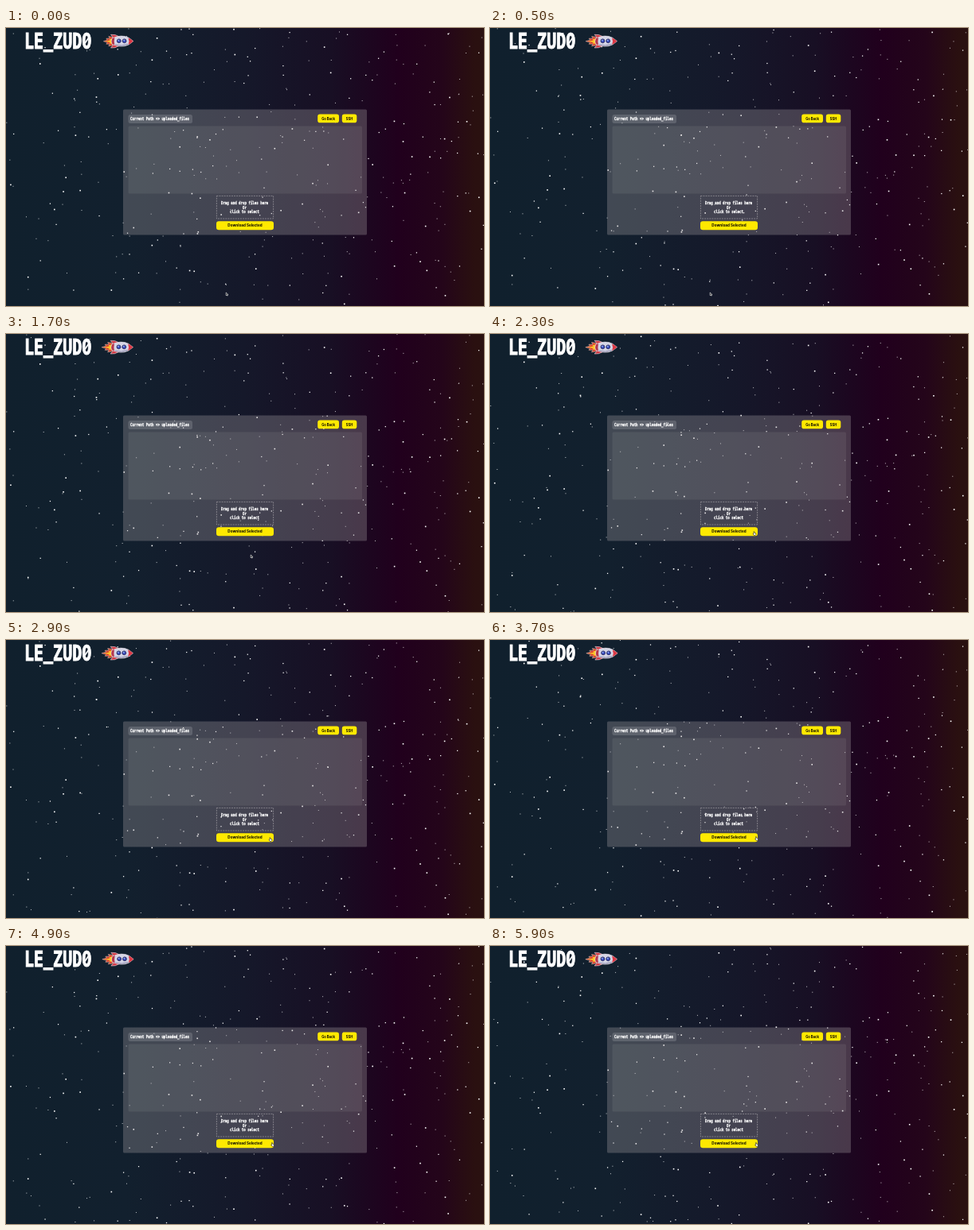
These frames come from a looping animation (600x350 px, 6 s). An HTML page with a canvas:

```html
<!DOCTYPE html>
<html lang="fr">
<head>
<meta charset="utf-8">
<title>LE_ZUDO</title>
<style>
  html, body { margin: 0; width: 100%; height: 100%; overflow: hidden; }
  body {
    position: relative;
    background: linear-gradient(90deg, #10202d 0, #12202e 25%, #15182a 50%, #180f24 68%,
      #1c0720 75%, #21001d 82%, #24051a 91%, #2a1010 98%, #2a1110 100%);
  }
  canvas, svg { position: absolute; left: 0; top: 0; width: 600px; height: 350px; }
  .pixel { font: bold 4.1px "DejaVu Sans Mono", monospace; fill: #fff; stroke: #fff; stroke-width: .22; }
  .title { font-size: 20px; stroke-width: .8; }
  .label { font: 700 4.15px Inter, sans-serif; fill: #000; text-anchor: middle; }
  .big { font-size: 4.6px; }
  .mid { text-anchor: middle; }
  .yellow { fill: #ffe900; }
</style>
</head>
<body>
<canvas id="sky" width="600" height="350"></canvas>
<svg viewBox="0 0 600 350">
  <g transform="translate(23 26) scale(1 1.37)">
    <text class="pixel title">LE<tspan dy="-1.2">_</tspan><tspan dy="1.2">ZUDO</tspan></text>
  </g>
  <path d="M98.5 20L104 12" stroke="#fff" stroke-width="1.8"/>

  <g id="rocket" stroke-linejoin="round">
    <g id="flame">
      <path d="M134 11.5L128 10.5L129.5 13L124.5 13.2L126 15L120.5 16.7L126 18.2L124.5 20.2L129.5 20.2L128 22.8L134 21.8Z" fill="#d9452f" stroke="#e9d3c8" stroke-width=".5"/>
      <path d="M134 13L129 14.2L130 15.4L123.5 16.7L130 18L129 19.2L134 20.3Z" fill="#ffc62b"/>
    </g>
    <path d="M135 12.5L131.5 8.3L137 8.6L143 11.2Z M135 20.8L131.5 25L137 24.7L143 22Z" fill="#d23a44" stroke="#eadfe8" stroke-width=".6"/>
    <path d="M133 13Q145 7.6 154 12.2L159.8 16.6L154 21Q145 25.6 133 20.2Q131.4 16.6 133 13Z" fill="#d5d5e6" stroke="#f3edf4" stroke-width=".6"/>
    <path d="M153.5 12.2Q157.5 14 159.6 16.6Q157.5 19.2 153.5 21Q155.2 16.6 153.5 12.2Z" fill="#dc3945"/>
    <path d="M133.2 13.2L136.3 12Q135.3 16.6 136.3 21.2L133.2 20Q131.8 16.6 133.2 13.2Z" fill="#b5364c"/>
    <path d="M137 21Q145 23.6 153 20.4" fill="none" stroke="#8c8bad" stroke-width="1"/>
    <g fill="#3c4fc0" stroke="#25265c" stroke-width=".9">
      <circle cx="141.8" cy="16.3" r="2.4"/><circle cx="148.6" cy="16.3" r="2.4"/>
    </g>
    <g fill="#a9c8ff"><circle cx="141.3" cy="15.6" r=".8"/><circle cx="148.1" cy="15.6" r=".8"/></g>
  </g>

  <rect x="147" y="102.5" width="306" height="158" rx="1.6" fill="#aea9ad" fill-opacity=".3"/>
  <rect x="153.5" y="123.5" width="293.5" height="85" rx="1.6" fill="#fff4e6" fill-opacity=".07"/>
  <rect x="153.5" y="109" width="80.5" height="11" rx="2.5" fill="#fff" fill-opacity=".15"/>
  <rect x="264.4" y="211.4" width="71.2" height="28.6" fill="none" stroke="#b0adb2" stroke-width=".6" stroke-dasharray="1.9 1.2"/>
  <g class="yellow">
    <rect x="391.2" y="108.6" width="26.8" height="10.6" rx="2.8"/>
    <rect x="421.8" y="108.6" width="18.5" height="10.6" rx="2.8"/>
    <rect x="264" y="243.2" width="72" height="11" rx="3.2"/>
  </g>
  <text class="label" x="404.5" y="115.6">Go Back</text>
  <text class="label" x="431.1" y="115.6">SSH</text>
  <text class="label big" x="300" y="250.4">Download Selected</text>

  <g transform="translate(156 116.2) scale(1 1.35)"><text class="pixel">Current Path =&gt; uploaded_files</text></g>
  <g transform="translate(299.5 222.1) scale(1 1.35)"><text class="pixel mid">Drag and drop files here</text></g>
  <g transform="translate(299.5 227.6) scale(1 1.35)"><text class="pixel mid">Or</text></g>
  <g transform="translate(299.5 232.8) scale(1 1.35)"><text class="pixel mid">click to select</text></g>

  <g id="cursor" stroke="#fff" stroke-width=".6" stroke-linejoin="round">
    <path id="arrow" d="M-.8 -2L-.8 1.7L.1 1L.7 2.2L1.3 1.9L.8 .8L2 .7Z" fill="#111"/>
    <path id="hand" d="M-1 -2.2L-.3 -2.2L0 -.6L1.8 0L1.7 1.6L1 2.4L-.8 2.4L-1.9 .6L-1 .6Z" fill="#fff" stroke="#222"/>
  </g>
</svg>
<script>
const LOOP = 6000, STEP = 100, W = 600, H = 350;
const $ = id => document.getElementById(id);
const ctx = $('sky').getContext('2d');

let seed = 71;
const rand = () => (seed = (seed * 16807) % 2147483647) / 2147483647;

// count, size, upward speed in px/s, opacity
const layers = [[190, 1, 12.5, .75], [110, 1.25, 6.25, 1], [60, 1.6, 4.2, 1]].map(
  ([count, size, speed, alpha]) => ({
    size, speed, alpha,
    stars: Array.from({ length: count }, () => [rand() * W, rand() * H])
  }));

// time, x, y
const route = [[0, 277, 335], [1300, 277, 335], [1700, 308, 280],
  [2300, 332, 251], [3100, 332, 251], [3500, 334.6, 249.8], [LOOP, 334.6, 249.8]];

function cursorAt(t) {
  const i = route.findIndex(p => p[0] > t);
  const [t0, x0, y0] = route[i - 1], [t1, x1, y1] = route[i];
  const k = (t - t0) / (t1 - t0);
  return [x0 + (x1 - x0) * k, y0 + (y1 - y0) * k];
}

function drawSky(t) {
  ctx.clearRect(0, 0, W, H);
  ctx.fillStyle = '#fff';
  for (const { size, speed, alpha, stars } of layers) {
    ctx.globalAlpha = alpha;
    for (const [x, y] of stars) {
      const top = (y - speed * t / 1000 + H) % H;
      ctx.fillRect(x, top, size, size);
    }
  }
}

function draw(now) {
  const t = Math.floor(now % LOOP / STEP) * STEP;
  drawSky(t);

  const sway = .4 * Math.sin(t / LOOP * Math.PI * 20);
  const stretch = [.86, 1, .94, 1.02][t / STEP % 4];
  $('rocket').setAttribute('transform', `translate(${sway} 0)`);
  $('flame').setAttribute('transform', `translate(134 0) scale(${stretch} 1) translate(-134 0)`);

  const [x, y] = cursorAt(t);
  const over = x > 264 && x < 336 && y > 243 && y < 254.3;
  $('cursor').setAttribute('transform', `translate(${x} ${y})`);
  $('arrow').style.display = over ? 'none' : '';
  $('hand').style.display = over ? '' : 'none';
}

const start = performance.now();
function tick() {
  draw(performance.now() - start);
  requestAnimationFrame(tick);
}
tick();
</script>
</body>
</html>
```
